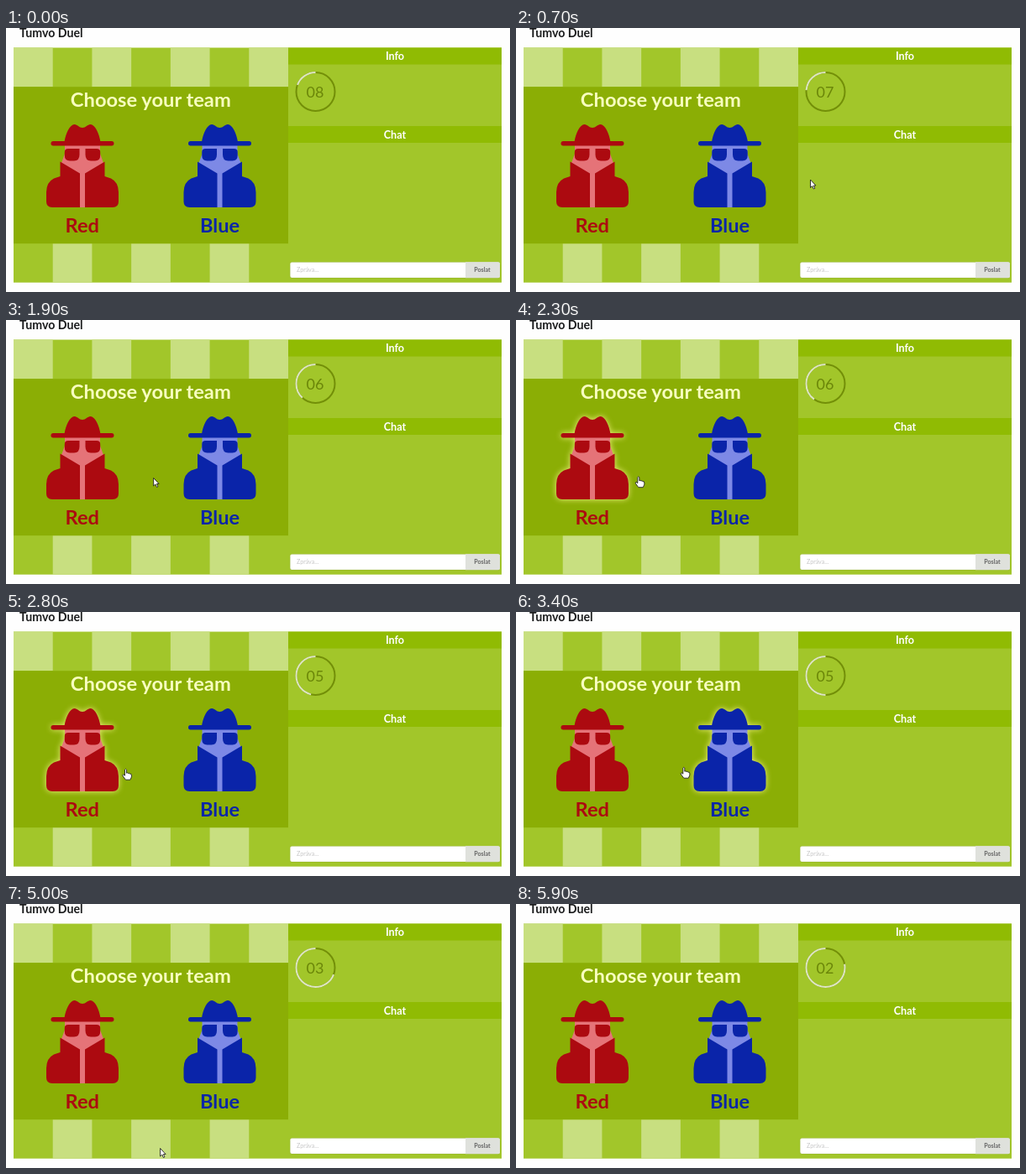
Recreate the animation shown at these times as an HTML page. Size 600 px wide and 315 px high, loop 6 s.

```html
<!DOCTYPE html>
<html lang="en">
<head>
<meta charset="utf-8">
<title>Team choice</title>
<style>
  html, body { margin: 0; width: 100%; height: 100%; overflow: hidden; background: #fefefe; }
  svg { display: block; width: 600px; height: 315px; font-family: Lato, sans-serif; }
  .bold { font-weight: 700; }
  .mid { text-anchor: middle; }
  .head { font-size: 12.6px; fill: #fff; }
  .team { font-size: 23.6px; }
  .glow { filter: drop-shadow(0 0 3.5px #f0f07c); }
  .red { --coat: #ac0a10; --skin: #e57378; }
  .blue { --coat: #0a24a9; --skin: #7d89e6; }
  .coat { fill: var(--coat); }
  .skin { fill: var(--skin); }
</style>
</head>
<body>
<svg viewBox="0 0 600 315">
  <defs>
    <!-- Spy, centred on x = 0 -->
    <g id="spy">
      <path class="skin" d="M-21 139H21V150L25 161L4 178V214H-4V178L-25 161L-21 150Z"/>
      <path class="coat" d="M-21.500 136C-20 126-15 115-9.500 115C-6 115-4 119 0 119S6 115 9.500 115C15 115 20 126 21.500 136Z"/>
      <rect class="coat" x="-37.5" y="135" width="75" height="5.4" rx="2.7"/>
      <g id="half">
        <path class="coat" d="M-3.500 144H-17Q-21.200 144-21.200 148V152Q-21.200 158.500-15 158.500H-10Q-3.500 158.500-3.500 151Z"/>
        <path class="coat" d="M-26.500 159.500L-3 173.500V214H-36Q-43 214-43 207V196Q-43 184-34 179.500L-26.500 177Z"/>
      </g>
      <use href="#half" transform="scale(-1 1)"/>
    </g>
  </defs>

  <text class="bold" x="16" y="10.5" font-size="14.2" fill="#1b1c1d">Tumvo Duel</text>

  <rect x="9" y="23.5" width="581" height="280.2" fill="#a2c62a"/>
  <g id="tiles" fill="#c8df80"></g>
  <rect x="9" y="70.2" width="327" height="187" fill="#8bae05"/>
  <text class="bold mid" x="172.3" y="94" font-size="23.7" fill="#f8ffbf">Choose your team</text>

  <g id="red" class="red">
    <use href="#spy" x="91"/>
  </g>
  <text class="red coat bold mid team" x="90.700" y="243.700">Red</text>
  <g id="blue" class="blue">
    <use href="#spy" x="254.500"/>
  </g>
  <text class="blue coat bold mid team" x="254.500" y="243.700">Blue</text>

  <g fill="#90bb03">
    <rect x="336" y="23.5" width="254" height="20"/>
    <rect x="336" y="117" width="254" height="20"/>
  </g>
  <text class="bold mid head" x="463" y="38">Info</text>
  <text class="bold mid head" x="463" y="131.700">Chat</text>

  <g fill="none" stroke-width="2" transform="translate(368.500 76)">
    <circle r="23" stroke="#738f08"/>
    <circle id="arc" r="23" stroke="#dfe6c4" pathLength="1" transform="rotate(-90) scale(1 -1)"/>
  </g>
  <text id="count" class="mid" x="368" y="82.500" font-size="18" fill="#6b8609"></text>

  <rect x="338.300" y="279.500" width="249.500" height="18.600" rx="2" fill="#fff" stroke="#222426" stroke-opacity=".13" stroke-width=".6"/>
  <path d="M547 279.300H586Q588 279.300 588 281.300V296.300Q588 298.300 586 298.300H547Z" fill="#dfe1dc"/>
  <text x="346" y="291.300" font-size="7.1" fill="#c6c6c6">Zpráva...</text>
  <text class="bold mid" x="567" y="291.300" font-size="7.1" fill="#626262">Poslat</text>

  <g id="cursor" fill="#fff" stroke="#222" stroke-width=".9" stroke-linejoin="round">
    <path id="arrow" d="M0 0V9.500L2.200 7.500L3.800 11L5.300 10.300L3.800 7H6.500Z"/>
    <path id="hand" transform="translate(-.7 -.8)" d="M-1 1Q0-.8 1 1V5Q2.500 4 3 5.300Q4.600 4.500 5 6Q7 5.300 7 7.500V9.500L5.500 13H0L-3 9Q-4.300 7-2.800 6.500L-1 8Z"/>
  </g>
</svg>
<script>
  const byId = id => document.getElementById(id);
  const show = (id, on) => { byId(id).style.display = on ? "" : "none"; };
  const LOOP = 6000, STEP = 100;
  const FIRST_TICK = 510, TICK = 1000, SWEEP = 830;

  // Pointer keys: time, x, y
  const path = [
    [200, 420, -14], [450, 376, 120], [700, 350.500, 181], [1050, 300, 188],
    [1400, 253, 183.500], [1700, 226, 187], [2000, 158, 189], [2300, 146.500, 187.500],
    [2700, 138, 188], [3050, 164, 188], [3400, 200.500, 186], [3800, 146, 186],
    [4200, 174, 184.500], [4500, 174, 184.500], [5200, 186, 318]
  ];

  const tile = 327 / 7;
  for (const [row, y] of [[0, 23.5], [1, 257.2]])
    for (let col = row; col < 7; col += 2)
      byId("tiles").innerHTML +=
        `<rect x="${9 + col * tile}" y="${y}" width="${tile}" height="46.5"/>`;

  const smooth = p => p * p * (3 - 2 * p);
  // Quick start, long settle
  const settle = p => smooth(1 - (1 - p) ** 2);

  function pointerAt(t) {
    const i = path.findIndex(key => key[0] > t);
    if (i < 1) return null;
    const [t0, x0, y0] = path[i - 1], [t1, x1, y1] = path[i];
    const p = smooth((t - t0) / (t1 - t0));
    return [x0 + (x1 - x0) * p, y0 + (y1 - y0) * p];
  }

  // Each tick drops the number at once, then sweeps the ring to the next tenth
  function drawTimer(t) {
    const sinceTick = t - FIRST_TICK + TICK;
    const ticks = Math.floor(sinceTick / TICK);
    const sweep = settle(Math.min(1, sinceTick % TICK / SWEEP));
    byId("arc").setAttribute("stroke-dasharray", `${(1 + ticks + sweep) / 10} 1`);
    byId("count").textContent = "0" + (8 - ticks);
  }

  function drawPointer(t) {
    const pos = pointerAt(t);
    const [x, y] = pos || [-99, -99];
    const inside = (from, to) => x > from && x < to && y > 110 && y < 220;
    const onRed = inside(31, 152), onBlue = inside(194, 315);
    byId("red").classList.toggle("glow", onRed);
    byId("blue").classList.toggle("glow", onBlue);
    show("cursor", pos);
    show("hand", onRed || onBlue);
    show("arrow", !onRed && !onBlue);
    byId("cursor").setAttribute("transform", `translate(${x} ${y})`);
  }

  const start = performance.now();
  function frame() {
    const elapsed = (performance.now() - start) % LOOP;
    const t = Math.floor(elapsed / STEP) * STEP;
    drawTimer(t);
    drawPointer(t);
    requestAnimationFrame(frame);
  }
  frame();
</script>
</body>
</html>
```
